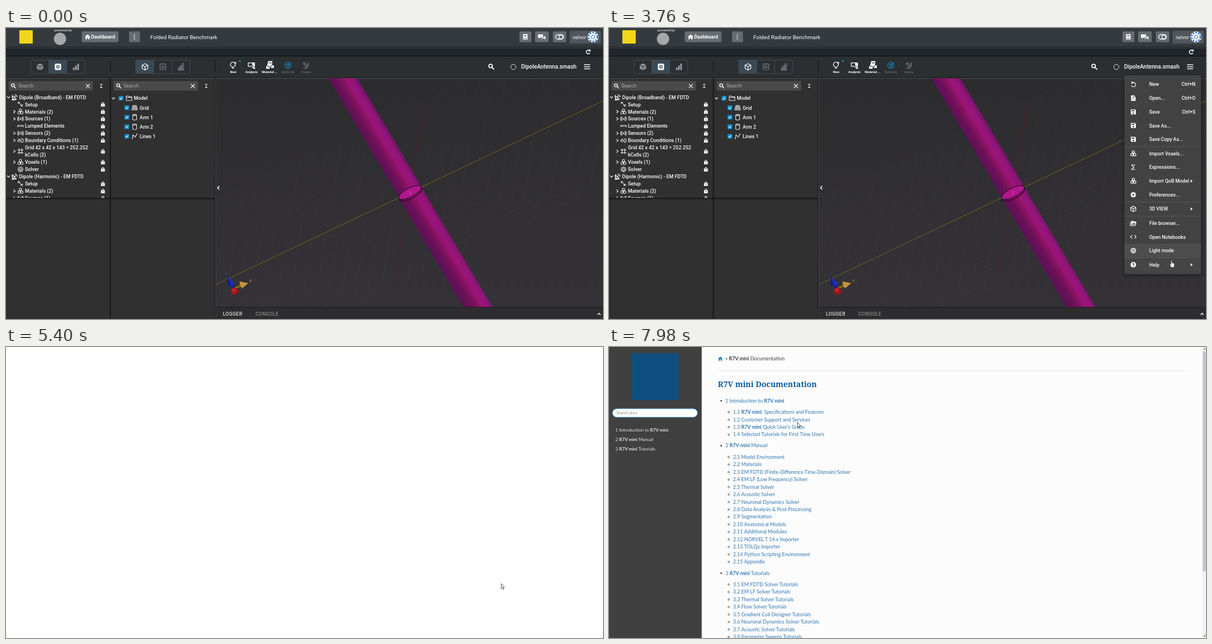
An HTML page for the animation above (8000 ms loop, 1072 by 523 pixels).

```html
<!DOCTYPE html>
<html lang="en">
<head>
<meta charset="utf-8">
<title>Simulation help</title>
<style>
html, body { margin: 0; width: 100%; height: 100%; overflow: hidden; background: #fff; }
svg { display: block; width: 100vw; height: 100vh; font-family: Roboto, sans-serif; }
text { white-space: pre; }
#doc, #blankDoc { font-family: Lato, sans-serif; }
</style>
</head>
<body>
<svg id="stage" viewBox="0 0 1072 523" preserveAspectRatio="none"></svg>
<script>
const PRODUCT = 'R7V mini';
const LOOP = 8000;

const rect = (x, y, w, h, fill, rest = '') =>
  `<rect x="${x}" y="${y}" width="${w}" height="${h}" fill="${fill}" ${rest}/>`;
const circle = (x, y, r, fill, rest = '') =>
  `<circle cx="${x}" cy="${y}" r="${r}" fill="${fill}" ${rest}/>`;
const line = (x1, y1, x2, y2, color, rest = '') =>
  `<path d="M${x1} ${y1}L${x2} ${y2}" stroke="${color}" ${rest}/>`;
// y is the middle of the capitals
const text = (x, y, s, size, fill = '#fff', weight = 400, rest = '') =>
  `<text x="${x}" y="${y + size * 0.36}" font-size="${size}" fill="${fill}" font-weight="${weight}" ${rest}>${s}</text>`;

// Icons are drawn around 0,0 in a box of about ten units.
const outlines = {
  right: 'M-1.5-2.5 1.5 0-1.5 2.5',
  left: 'M1.5-3-1.5 0 1.5 3',
  down: 'M-2.5-1.5 0 1.5 2.5-1.5',
  up: 'M-2.5 1.5 0-1.5 2.5 1.5',
  close: 'M-3.5-3.5 3.5 3.5M3.5-3.5-3.5 3.5',
  search: 'M1.5-1A2.6 2.6 0 1 1-3.7-1 2.6 2.6 0 1 1 1.5-1M.8.9 4.2 4.3',
  fold: 'M-2-3.5 0-1.5 2-3.5M-2 3.5 0 1.5 2 3.5',
  dish: 'M-4-3A5.4 5.4 0 0 0 3 4ZM-.5.5 2-2M0-4.5A4.5 4.5 0 0 1 4.5 0M-3 2-4.5 5H0',
  setup: 'M-4-4 0 0M-4-1V-4H-1M1 0V4M1 1H5M1 1 4 4',
  hex: 'M0-5 2-4V-1.5L0-.5-2-1.5V-4ZM-2.5-.5-.5.5V3.5L-2.5 4.5-4.5 3.5V.5ZM2.5-.5 4.5.5V3.5L2.5 4.5.5 3.5V.5Z',
  source: 'M-2-3A4 4 0 0 0-2 3M2-3A4 4 0 0 1 2 3M-3.5-4A5.5 5.5 0 0 0-3.5 4M3.5-4A5.5 5.5 0 0 1 3.5 4M-1 0A1 1 0 1 0 1 0 1 1 0 1 0-1 0',
  lumped: 'M-5 2V-1H-3M5 2V-1H3M-3 1V-2M-1 1V-2M1 1V-2M3 1V-2',
  bound: 'M-4-2Q-1-4-1 0T-4 2-2-1M1 3H2C0 0 1-3 3-3S6 0 4 3H5',
  mesh: 'M-5-2.5H5M-5 2.5H5M-2.5-5V5M2.5-5V5',
  gear: 'M-2 0A2 2 0 1 0 2 0 2 2 0 1 0-2 0M-4 0A4 4 0 1 0 4 0 4 4 0 1 0-4 0M0-5.3V-4M0 4V5.3M-5.3 0H-4M4 0H5.3M-3.7-3.7-3-3M3 3 3.7 3.7M3.7-3.7 3-3M-3 3-3.7 3.7',
  cube: 'M0-5 4.5-2.5V2.5L0 5-4.5 2.5V-2.5ZM-4.5-2.5 0 0 4.5-2.5M0 0V5',
  chip: 'M-3-4.5H3Q4.5-4.5 4.5-3V3Q4.5 4.5 3 4.5H-3Q-4.5 4.5-4.5 3V-3Q-4.5-4.5-3-4.5ZM-1.8 0A1.8 1.8 0 1 0 1.8 0 1.8 1.8 0 1 0-1.8 0',
  bars: 'M-4 5V1H-2V5ZM-1 5V-2H1V5ZM2 5V-5H4V5Z',
  folder: 'M-5-4H-1L0-2.5H5V4H-5ZM-5-1.5H5',
  plane: 'M-3-4H3L5 4H-5ZM-4-1H4M-4.5 1.5H4.5M-1-4-2 4M1-4 2 4',
  tube: 'M-3.5-4Q0-6 3.5-4V4Q0 6-3.5 4ZM-3.5-4Q0-2 3.5-4',
  lines: 'M-4 4-3-2 1 1 4-4M-5 4H-3M-4-2H-2M0 1H2M3-4H5',
  undo: 'M-3-2A4 4 0 1 1-3.5 2M-3-5V-2H0',
  reload: 'M3-2A3.5 3.5 0 1 0 3 2M3.5-4.5V-1.5H.5',
  sigma: 'M3.5-4H-3L1 0-3 4H3.5',
  code: 'M-2-3-5 0-2 3M2-3 5 0 2 3',
  target: 'M-4.5 0A4.5 4.5 0 1 0 4.5 0 4.5 4.5 0 1 0-4.5 0M-2 0A2 2 0 1 0 2 0 2 2 0 1 0-2 0M0 0 4-4',
  sweep: 'M-4-4 0 2 4-4M-4 4H1L4-1M-4-1 0-4',
  bulb: 'M-4-1A3.5 3.5 0 1 0 3-1 3.5 3.5 0 1 0-4-1M-2 4H1M3-5V-2M1.5-3.5H4.5',
};
const solids = {
  lock: 'M-3.4-1.2H-2V-2A2 2 0 0 1 2-2V-1.2H3.4V4H-3.4ZM-1-1.2H1V-2A1 1 0 0 0-1-2ZM-.7.5H.7V2H-.7Z',
  home: 'M0-4.5 5 0H3.7V4.3H1V1.2H-1V4.3H-3.7V0H-5Z',
  book: 'M-4-5H4V5H-4ZM-2-3V-1H2V-3ZM-3 3V4H3V3Z',
  chat: 'M-6-4H2V1H-2L-5 3V1H-6ZM3-1H6V4L4 3H-1V2H3Z',
  file: 'M-4-5H1L4-2V5H-4ZM0-4V-1H3ZM-2 1V2H1V1Z',
  save: 'M-4.5-4.5H3L4.5-3V4.5H-4.5ZM-3-3.2V-1H2V-3.2ZM-1.2 1H1.2V3.4H-1.2Z',
  image: 'M-4-4H0L1-3H5V3H-4ZM-3 2H4L2-1 0 1-1 0ZM-6-2H-5V4H4V5H-6Z',
  manual: 'M-5-4H5V4H-5ZM0-3V3H4V-3ZM1-2V-1H3V-2ZM1 0V1H3V0Z',
  help: 'M-5 0A5 5 0 1 0 5 0 5 5 0 1 0-5 0M-.6 2H.6V3.2H-.6ZM-2-1A2 2 0 1 1 .6.9V1.2H-.6V0A.8.8 0 1 0-.9-1Z',
  cog: 'M-1-5H1L1.4-3.5 3-4.2 4.3-2.6 3.5-1 5-.5V1L3.5 1.4 4.2 3 2.6 4.3 1 3.6.5 5H-1L-1.4 3.6-3 4.2-4.2 2.7-3.5 1.3-5 .8V-.8L-3.6-1.3-4.2-3-2.7-4.2-1.3-3.5ZM-1.6 0A1.6 1.6 0 1 0 1.6 0 1.6 1.6 0 1 0-1.6 0',
  chart: 'M-5-4H5V2H-5ZM-4-3V1H1V-3ZM2 0 6 5H3L0 2Z',
  sheet: 'M-2-6H4L3 2H-4ZM-1-4V-3H3V-4ZM-5 1H0V5H-5ZM2 0H6V4H2Z',
  play: 'M-1.5-2.8 2 0-1.5 2.8Z',
  solidCube: 'M0-5.3 4.8-2.8 0-.4-4.8-2.8ZM-5-2-.4.4V5.3L-5 2.8ZM5-2 .4.4V5.3L5 2.8Z',
  solidChip: 'M-3-5H3Q5-5 5-3V3Q5 5 3 5H-3Q-5 5-5 3V-3Q-5-5-3-5ZM-2.6 0A2.6 2.6 0 1 0 2.6 0 2.6 2.6 0 1 0-2.6 0M-1.3 0A1.3 1.3 0 1 0 1.3 0 1.3 1.3 0 1 0-1.3 0',
  solidBars: 'M-4.8 5V1H-2V5ZM-1.4 5V-2H1.4V5ZM2 5V-5H4.8V5Z',
};
const icon = (name, x, y, color = '#e4e4e4', scale = 1, width = 1.1) => {
  const paint = outlines[name]
    ? `d="${outlines[name]}" fill="none" stroke="${color}" stroke-width="${width}"`
    : `d="${solids[name]}" fill="${color}" fill-rule="evenodd"`;
  return `<path transform="translate(${x} ${y}) scale(${scale})" ${paint}/>`;
};

function header() {
  const button = (x, w) => rect(x, 6, w, 19.5, '#666c71', 'rx="2"');
  let s = rect(0, 0, 1072, 34, '#353a3f') + rect(0, 34, 1072, 1.5, '#0c0e10')
    + rect(0, 35.5, 1072, 14.5, '#20252a') + rect(0, 50, 1072, 1.2, '#0c0e10')
    + rect(0, 51, 1072, 38, '#2b2f32') + rect(0, 89, 1072, 1.5, '#121314');
  s += rect(24, 4, 24, 24, '#f3d61c') + circle(97, 19.5, 11, '#a5a7a9')
    + text(86.5, 3.8, 'powered by', 6.2);
  s += button(136, 66) + icon('home', 146.5, 16, '#fff') + text(153, 16.3, 'Dashboard', 8.8, '#fff', 700);
  s += button(221, 19.5) + [12.5, 16, 19.5].map(y => circle(230.5, y, 1, '#fff')).join('');
  s += text(259, 16.6, 'Folded Radiator Benchmark', 9.8);
  s += button(922, 21.5) + icon('book', 932.5, 16, '#fff') + button(950, 24.5) + icon('chat', 962, 16, '#fff', 1.1)
    + button(982, 24) + '<rect x="987" y="12" width="14" height="8" rx="4" fill="none" stroke="#fff" stroke-width="1.4"/>'
    + circle(996.5, 16, 3.5, 'none', 'stroke="#fff" stroke-width="1.3"');
  s += rect(1012, 5, 56, 23, '#50565c', 'rx="2"') + text(1017.5, 16.7, 'nelvor', 8.8)
    + circle(1054, 16, 10, '#fff') + circle(1054, 16, 8, 'none', 'stroke="#3b78c4" stroke-width="3" stroke-dasharray="3 2.2"')
    + circle(1054, 16, 3.2, 'none', 'stroke="#3b78c4" stroke-width="2" stroke-dasharray="2 1.3"');
  s += icon('reload', 1045.5, 43, '#fff', 1, 1.5);
  return s;
}

function toolbar() {
  const group = (x, active, color, names) => rect(x, 57.5, 97, 24.5, '#2b2f32', 'rx="2" stroke="#464b50"')
    + rect(x + active * 32.3, 58, 32.3, 23.5, '#3a4a56')
    + names.map((n, i) =>
        icon(n, x + 16.5 + i * 32.3, 69.8, i === active ? '#fff' : color, 1.15, 1)).join('')
    + [1, 2].map(i => line(x + i * 32.3, 58, x + i * 32.3, 82, '#464b50')).join('');
  let s = group(44.5, 1, '#8e9397', ['solidCube', 'solidChip', 'solidBars'])
    + group(233, 0, '#7d8286', ['cube', 'chip', 'bars'])
    + line(187.5, 58, 187.5, 80, '#101214') + line(375.5, 58, 375.5, 80, '#101214');
  [['New', 'bulb', '#fff'], ['Analysis', 'chart', '#fff'], ['Material ...', 'sheet', '#fff'],
   ['Optimize', 'target', '#1b77a8'], ['Sweep', 'sweep', '#777']].forEach(([label, name, color], i) => {
    const x = 408 + i * 32.7;
    s += icon(name, x, 67, color, 1.25)
      + text(x, 78.7, label, 5.8, i < 3 ? '#fff' : '#777', i < 3 ? 700 : 400, 'text-anchor="middle"');
  });
  s += '<path d="M417.5 58.5h5l-2.5 3z" fill="#1c9be0"/>' + icon('search', 871.5, 69.5, '#fff', 1.2, 1.5)
    + circle(911, 70, 4.6, 'none', 'stroke="#ddd"') + text(925, 69.8, 'DipoleAntenna.smash', 10.1, '#fff', 500)
    + [66, 69.7, 73.4].map(y => rect(1038, y - 0.7, 11, 1.4, '#fff')).join('');
  return s;
}

function panels() {
  const searchBox = (x, close) => rect(x, 95.5, 151.5, 17, '#4a4a4a', 'rx="1.5"')
    + icon('search', x + 9, 104, '#fff', 1, 1.4) + text(x + 17.5, 104.2, 'Search', 9, '#aaa')
    + icon('close', close, 104.2, '#fff', 1, 1.2) + icon('fold', close + 24, 104, '#fff', 0.95, 1.2);
  let s = rect(0, 90.5, 376, 433, '#303030') + searchBox(4.5, 147) + searchBox(193.5, 335.5);
  const rows = [
    ['Dipole (Broadband) - EM FDTD'], ['Setup', 'setup'], ['Materials (2)', 'hex', 1], ['Sources (1)', 'source', 1],
    ['Lumped Elements', 'lumped'], ['Sensors (2)', 'source', 1], ['Boundary Conditions (1)', 'bound', 1],
    ['Grid 42 x 42 x 143 = 252.252', 'mesh', 1], ['kCells (2)'], ['Voxels (1)', 'hex', 1], ['Solver', 'gear'],
    ['Dipole (Harmonic) - EM FDTD'], ['Setup', 'setup'], ['Materials (2)', 'hex', 1], ['Sources (1)', 'source', 1]];
  s += '<g clip-path="url(#treeClip)">';
  rows.forEach(([label, name, branch], i) => {
    const y = 124.3 + i * 12.97;
    const top = label.startsWith('Dipole');
    const iconY = name === 'mesh' ? y + 6.5 : y;
    s += text(top ? 23.5 : 34, y + 0.1, label, 8.85, '#fff', 500);
    if (top) s += icon('down', 4.5, y, '#fff') + icon('dish', 15.5, y, '#fff', 1, 1.3);
    if (name) s += icon(name, 26, iconY) + icon('lock', 174, iconY, '#fff');
    if (branch) s += icon('right', 15, iconY, '#fff');
  });
  s += '</g>';
  const check = (x, y) => rect(x - 4.2, y - 4.2, 8.4, 8.4, '#118bc9', 'rx="1"')
    + `<path d="M${x - 2.3} ${y}l1.7 1.8 3-3.6" fill="none" stroke="#fff" stroke-width="1.1"/>`;
  s += icon('down', 193, 126.3, '#fff') + check(206.5, 126.3) + icon('folder', 221, 126.3) + text(229.5, 126.2, 'Model', 8.85, '#fff', 500);
  [['Grid', 'plane'], ['Arm 1', 'tube'], ['Arm 2', 'tube'], ['Lines 1', 'lines']].forEach(([label, name], i) => {
    const y = 143.3 + i * 17.1;
    s += check(217, y) + icon(name, 231, y) + text(240, y + 0.2, label, 8.85, '#fff', 500);
  });
  return s + rect(0, 305.5, 376, 2, '#141414') + rect(186.5, 90, 1.8, 433, '#141414') + rect(374.8, 90, 1.8, 433, '#141414');
}

function viewport() {
  let s = rect(376.5, 90.5, 696, 412, 'url(#sky)') + '<g clip-path="url(#viewClip)">';
  for (let i = -14; i <= 14; i++) {
    const x = 725 - i * 1.95, y = 296.5 + i * 11.8;
    s += line(x - 400, y + 190, x + 400, y - 190, '#fff', 'opacity=".022"');
    const cx = 725 + i * 25, cy = 296.5 - i * 11.9;
    s += line(cx + 27, cy - 165, cx - 27, cy + 165, '#fff', 'opacity=".022"');
  }
  s += line(751, 139, 696, 470, '#5f1b20') + line(377, 461, 1072, 131, '#6f671d')
    + '<path d="M578.5 90H630.5L746 285 705 303Z" fill="url(#tubeShade)"/><path d="M706 307 747 288 874.5 503H822.5Z" fill="url(#tubeShade)"/>'
    + '<g fill="none" stroke="#170812" stroke-width=".9" transform="translate(725.5 295.5) rotate(-27)">'
    + '<ellipse rx="22.5" ry="8" fill="#b0188c"/><path d="M-23.5 2.5A22.5 8 0 0 0 22 3.5V0"/></g>'
    + line(725, 293, 726, 299, '#e94fc5') + line(746, 286, 760, 279.5, '#6f671d') + '</g>';
  s += line(410, 472, 405, 461, '#14249a', 'stroke-width="5"') + line(411, 468, 422, 462.5, '#80621f', 'stroke-width="4"')
    + '<path d="M398 446.5 411 459Q406 464 398.5 463Z" fill="#1a2fc0"/><path d="M398 446.5 404 462 398.5 463Z" fill="#101f85"/>'
    + '<path d="M435 458.5 424 468Q419 463 419.5 455.5Z" fill="#c4953a"/>' + circle(410, 473, 6.5, '#a81316') + circle(409, 471, 3, '#c4272a')
    + text(395.5, 440.5, 'z', 6, '#2b46d8') + text(437.5, 453, 'y', 7, '#c79a38');
  return s + icon('left', 381.5, 287, '#fff', 1.05, 1.4)
    + rect(376.5, 502, 696, 21, '#2d2d2f') + rect(376.5, 501.5, 696, 1, '#1b1b1c')
    + text(389.5, 514, 'LOGGER', 8.6, '#ddd', 500, 'letter-spacing=".45"') + text(448, 514, 'CONSOLE', 8.6, '#888', 500, 'letter-spacing=".45"')
    + icon('up', 1065, 514, '#fff', 1, 1.4);
}

const menuItems = [
  ['New', 'undo', 'Ctrl+N'], ['Open...', 'file', 'Ctrl+O'], ['Save', 'save', 'Ctrl+S'], ['Save As...', 'save'], ['Save Copy As...', 'save'],
  ['Import Voxels...', 'hex', '', 1], ['Expressions...', 'sigma'], ['Import QoB Model', 'hex', 'sub'], ['Preferences...', 'cog'],
  ['3D VIEW', 'cube', 'sub', 1], ['File browser...', 'image', '', 1], ['Open Notebooks', 'code'], ['Light mode', 'gear'], ['Help', 'help', 'sub', 1]];
let separators = 0;
const menuRows = menuItems.map(([label, name, extra, split], i) => {
  separators += split ? 1 : 0;
  return { label, name, extra, split, y: 101.2 + i * 24.72 + separators * 0.75 };
});
const shadow = 'rx="2" filter="url(#shadow)"';

const menu = () => rect(925.5, 85, 137.5, 357.5, '#424242', shadow) + menuRows.map(r =>
  rect(925.5, r.y - 12.4, 137.5, 24.7, '#535353', 'class="hover" opacity="0"')
  + (r.split ? rect(925.5, r.y - 12.9, 137.5, 0.8, '#5c5c5c') : '')
  + icon(r.name, 941.5, r.y, '#fff', 1, 1.2) + text(970, r.y, r.label, 8.75, '#fff', 500)
  + (r.extra === 'sub' ? icon('play', 1046, r.y, '#fff')
    : text(1053, r.y, r.extra || '', 8.75, '#fff', 500, 'text-anchor="end"'))).join('');

const submenu = () => rect(796, 408.5, 129.5, 58.5, '#424242', shadow)
  + rect(796, 413.5, 129.5, 24.7, '#535353', 'id="subHover"')
  + ['r7v:web Manual', 'API documentation'].map((label, i) =>
      icon('manual', 812.5, 426 + i * 24.7, '#fff') + text(840, 426 + i * 24.7, label, 8.75, '#fff', 500)).join('')
  + circle(892, 425, 8, '#fff', 'id="ripple" opacity=".08"');

const bold = s => s.replace('@', `<tspan font-weight="700">${PRODUCT}</tspan>`).replace('&', '&amp;');
const chapters = [
  [96.5, '1 Introduction to @', ['@: Specifications and Features', 'Customer Support and Services', '@ Quick User’s Guide', 'Selected Tutorials for First Time Users']],
  [177.2, '2 @ Manual', ['Model Environment', 'Materials', 'EM FDTD (Finite-Difference Time-Domain) Solver', 'EM LF (Low Frequency) Solver',
    'Thermal Solver', 'Acoustic Solver', 'Neuronal Dynamics Solver', 'Data Analysis & Post Processing', 'Segmentation', 'Anatomical Models',
    'Additional Modules', 'NORVEL T 14.x Importer', 'TOLQy Importer', 'Python Scripting Environment', 'Appendix']],
  [406.3, '3 @ Tutorials', ['EM FDTD Solver Tutorials', 'EM LF Solver Tutorials', 'Thermal Solver Tutorials', 'Flow Solver Tutorials',
    'Gradient Coil Designer Tutorials', 'Neuronal Dynamics Solver Tutorials', 'Acoustic Solver Tutorials', 'Parameter Sweeps Tutorials']]];

// Before its fonts load, the page sits a little higher and shows no text.
function docPage(loaded) {
  const shift = loaded ? 0 : -3;
  const label = (...args) => loaded ? text(...args) : '';
  const link = '#2f77b3';
  let s = rect(0, 0, 1072, 523, '#fcfcfc') + rect(0, 0, 166.5, 523, '#404040') + rect(40, 11, 85, 84.5, '#0f4f80', 'rx="4"')
    + rect(6, 110.3 + (loaded ? 0.5 : 0), 153, 15.5, '#fff', 'rx="7.7" stroke="#2980b9" stroke-width="1"')
    + label(13, 118.5, 'Search docs', 7.2, '#888')
    + rect(196, loaded ? 42 : 41, 839, 1, '#e1e4e5')
    + rect(1065, 0, 7, 523, '#f1f1f1') + rect(1066.5, 8, 5, loaded ? 395 : 397.5, '#c1c1c1')
    + '<path d="M1067.5 4.5h4l-2-2.5zM1067.5 518.5h4l-2 2.5z" fill="#505050"/>';
  chapters.forEach(([y, title, items], i) => {
    s += label(11.5, 149.4 + i * 16.6, bold(title), 8.1, '#e4e4e4')
      + circle(201.5, y + shift + 0.3, 1.5, '#404040') + label(209, y, bold(title), 9, link);
    items.forEach((item, k) => {
      const rowY = y + 20.3 + k * 13.46;
      s += circle(215, rowY + shift + 0.3, 1.5, 'none', 'stroke="#404040" stroke-width=".8"')
        + label(222.7, rowY, `${i + 1}.${k + 1} ` + bold(item), 9, link);
    });
  });
  if (loaded) s += icon('home', 200, 21, '#2980b9', 0.85)
    + text(209, 21.2, bold('» @ Documentation'), 9, '#404040')
    + text(195.5, 67, PRODUCT + ' Documentation', 14, '#0d5c9e', 700, 'font-family="Noto Serif, serif" font-stretch="condensed"');
  return s;
}

const stage = document.getElementById('stage');
stage.innerHTML = `<defs>
  <linearGradient id="sky" x2="0" y2="1"><stop stop-color="#2c2b2e"/><stop offset="1" stop-color="#343236"/></linearGradient>
  <linearGradient id="tubeShade" gradientUnits="userSpaceOnUse" x1="705" y1="304" x2="745" y2="280">
    <stop stop-color="#5c1156"/><stop offset=".25" stop-color="#6a1058"/><stop offset=".45" stop-color="#85125f"/>
    <stop offset=".62" stop-color="#9d1378"/><stop offset=".82" stop-color="#8e1678"/><stop offset="1" stop-color="#6e1365"/>
  </linearGradient>
  <filter id="shadow" x="-20%" y="-20%" width="140%" height="140%"><feDropShadow dx="0" dy="2" stdDeviation="3" flood-opacity=".5"/></filter>
  <clipPath id="treeClip"><path d="M0 90H186V305.5H0Z"/></clipPath>
  <clipPath id="viewClip"><path d="M376.5 90.5H1072V502H376.5Z"/></clipPath>
</defs>
<g id="app">${header() + toolbar() + panels() + viewport()}
  ${circle(1043, 69.7, 12.5, '#fff', 'id="press"')}
  <g id="menu">${menu()}</g><g id="submenu">${submenu()}</g></g>
${rect(0, 0, 1072, 523, '#fff', 'id="blank"')}
<g id="blankDoc">${docPage(false)}</g><g id="doc">${docPage(true)}</g>
<g id="cursor" fill="#fff" stroke="#111" stroke-width=".7" stroke-linejoin="round">
  <path id="arrow" d="M.3.3V9.2L2.2 7.5 3.6 10.6 4.9 10 3.6 7H6.2Z"/>
  <path id="hand" d="M-1 .9C-1-.3 1-.3 1 .9V4.4L4.8 5.4C6 6 5.6 8 4.6 10.6V13H-.4C-1 11-2.4 9.6-3.4 7.6-3.5 6.4-2 6.5-1 7.8Z"/>
</g>`;

// Cursor tip: time, x, y
const path = [
  [70, 1009, 448], [180, 985, 340], [280, 989, 271], [500, 989, 271], [1320, 1039.5, 68],
  [1940, 1039.5, 68], [2290, 1024.5, 188], [2780, 1022.5, 326], [3620, 1010.5, 402],
  [3760, 1010, 417.5], [3900, 1008.5, 423.5], [4160, 1008.5, 423.5], [4980, 889, 425],
  [5460, 889, 425], [5810, 884, 421], [6270, 884, 421], [6810, 880.5, 417], [6950, 880.5, 417],
  [7080, 877, 416], [7210, 877, 416], [7840, 346, 132], [7980, 338, 135], [LOOP, 338, 135]];

function cursorAt(time) {
  const next = path.findIndex(p => p[0] > time);
  if (next < 1) return path[0].slice(1);
  const [t0, x0, y0] = path[next - 1], [t1, x1, y1] = path[next];
  const k = (time - t0) / (t1 - t0);
  return [x0 + (x1 - x0) * k, y0 + (y1 - y0) * k];
}

const $ = id => document.getElementById(id);
const show = (id, on) => $(id).setAttribute('visibility', on ? 'visible' : 'hidden');
const fade = (id, value) => $(id).setAttribute('opacity', value);
const ramp = (t, from, to) => Math.min(1, Math.max(0, (t - from) / (to - from)));
const hovers = [...document.querySelectorAll('.hover')];

// Row highlights fade, so each one averages the last moments of the cursor.
function updateHover(time) {
  const samples = [0, 40, 80, 120, 160, 200].map(lag => cursorAt(time - lag));
  hovers.forEach((el, i) => {
    const inside = samples.filter(([x, y]) => x > 926 && Math.abs(y - menuRows[i].y) < 12.36).length;
    el.setAttribute('opacity', inside / samples.length);
  });
}

function draw() {
  const t = performance.now() % LOOP;
  const [x, y] = cursorAt(t);
  fade('press', t < 1450 ? 0 : 0.15 * (1 - ramp(t, 1500, 1800)));
  fade('menu', ramp(t, 1500, 1700));
  fade('submenu', ramp(t, 4200, 4400));
  fade('subHover', ramp(t, 4780, 4920));
  updateHover(t);
  show('app', t < 5400);
  show('ripple', t >= 5190 && t < 5400);
  show('blank', t >= 5400);
  show('blankDoc', t >= 5670 && t < 5880);
  show('doc', t >= 5880);
  const hand = t >= 1250 && t < 5260;
  $('cursor').setAttribute('transform', `translate(${x} ${y})`);
  show('arrow', t >= 70 && !hand);
  show('hand', hand);
  requestAnimationFrame(draw);
}
draw();
</script>
</body>
</html>
```
